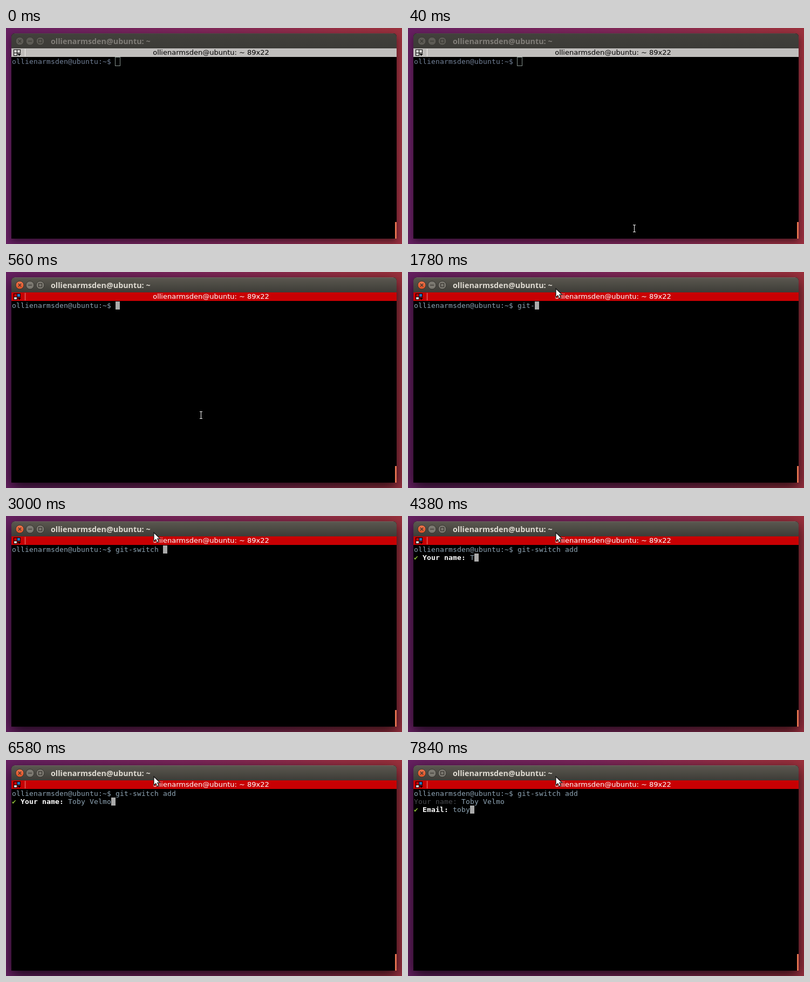
An HTML page with a canvas that plays this animation: 734x403 px, repeating every 8000 ms.

```html
<!DOCTYPE html>
<html lang="en">
<head>
<meta charset="utf-8">
<title>Terminal session</title>
<style>
  html, body { margin: 0; height: 100%; overflow: hidden; background: #5e1c5a; }
  canvas { display: block; }
</style>
</head>
<body>
<canvas id="stage" width="734" height="403"></canvas>
<script>
const ctx = document.getElementById('stage').getContext('2d');
const LOOP = 8000, FOCUS = 560;
const CELL = 8, LINE = 15, LEFT = 11, TOP = 55;
const HOST = 'ollienarmsden@ubuntu';

const COMMAND = { text: 'git-switch add', times: [1460, 1540, 1620, 1780, 2000, 2140, 2240, 2380, 2600, 2700, 3000, 3120, 3220, 3340] };
const NAME = { text: 'Toby Velmo', times: [4380, 4500, 4620, 4740, 5640, 5920, 6120, 6240, 6460, 6580] };
const EMAIL = { text: 'toby', times: [7500, 7620, 7740, 7840] };
const ENTER = 3680, ASK_NAME = 3760, ASK_EMAIL = 6900;

const typed = ({ text, times }, t) => text.slice(0, times.filter(at => at <= t).length);

function rect(color, x, y, w, h) {
  ctx.fillStyle = color;
  ctx.fillRect(x, y, w, h);
}

function label(text, x, y, font, color, align = 'left') {
  ctx.font = font;
  ctx.fillStyle = color;
  ctx.textAlign = align;
  ctx.fillText(text, x, y);
}

function vertical(y0, y1, ...colors) {
  const g = ctx.createLinearGradient(0, y0, 0, y1);
  colors.forEach((c, i) => g.addColorStop(i / (colors.length - 1), c));
  return g;
}

function line(color, width, ...points) {
  ctx.strokeStyle = color;
  ctx.lineWidth = width;
  ctx.beginPath();
  points.forEach(([x, y]) => ctx.lineTo(x, y));
  ctx.stroke();
}

function wallpaper() {
  const g = ctx.createLinearGradient(0, 100, 734, 0);
  g.addColorStop(0, '#651f61');
  g.addColorStop(0.5, '#7d2659');
  g.addColorStop(0.85, '#962e42');
  g.addColorStop(1, '#9a303c');
  rect(g, 0, 0, 734, 403);
}

function windowFrame(active) {
  ctx.save();
  ctx.shadowColor = active ? 'rgba(0,0,0,.75)' : 'rgba(0,0,0,.5)';
  ctx.shadowBlur = active ? 24 : 14;
  ctx.shadowOffsetY = active ? 8 : 5;
  ctx.fillStyle = '#000';
  ctx.beginPath();
  ctx.roundRect(10, 10, 714, 383, [6, 6, 0, 0]);
  ctx.fill();
  ctx.restore();

  ctx.fillStyle = active ? vertical(10, 38, '#5b5850', '#3d3c37') : vertical(10, 38, '#42413c', '#3c3b37');
  ctx.beginPath();
  ctx.roundRect(10, 10, 714, 28, [6, 6, 0, 0]);
  ctx.fill();
  rect(active ? '#6a675f' : '#4b4944', 16, 10, 702, 1);

  label(HOST + ': ~', 83, 30, 'bold 14.3px "Open Sans", sans-serif', active ? '#dfdbd2' : '#807d78');
  titleButtons(active);
}

function titleButtons(active) {
  const glyph = active ? '#3a3733' : '#393833';
  [25.5, 44.5, 63.5].forEach((x, i) => {
    ctx.beginPath();
    ctx.arc(x, 24.5, 7.5, 0, 7);
    ctx.fillStyle = !active ? '#5d5b55' : i ? '#7b7870' : vertical(17, 32, '#f0764e', '#dd4f22');
    ctx.fill();
    ctx.strokeStyle = active ? '#33312d' : '#383732';
    ctx.lineWidth = 1;
    ctx.stroke();
  });
  line(glyph, 1.3, [22.8, 21.8], [28.2, 27.2]);
  line(glyph, 1.3, [28.2, 21.8], [22.8, 27.2]);
  line(glyph, 1.3, [41, 24.5], [48, 24.5]);
  ctx.strokeRect(60.5, 21.5, 6, 6);
}

function paneBar(active) {
  rect(active ? '#c80003' : '#c0bebc', 10, 38, 714, 16);
  rect('#000', 14, 40, 13, 12);
  const face = active ? '#c80003' : '#d4d2d0';
  rect(face, 15, 41, 5, 5);
  rect(active ? '#2477bd' : face, 21, 41, 5, 5);
  rect(active ? '#d8d6d4' : face, 15, 47, 5, 4);
  rect(active ? '#c80003' : '#c0bebc', 21, 47, 7, 6);
  ctx.fillStyle = '#000';
  ctx.beginPath();
  ctx.moveTo(21, 48);
  ctx.lineTo(28, 48);
  ctx.lineTo(24.5, 52);
  ctx.fill();
  rect(active ? '#ee8a84' : '#f0eeec', 35, 39, 1, 14);
  label(HOST + ': ~ 89x22', 380, 50, '13px "DejaVu Sans", sans-serif', active ? '#fff' : '#000', 'center');
}

// Writes on the character grid and returns the next free column.
function write(text, col, row, color, bold) {
  [...text].forEach((c, i) =>
    label(c, LEFT + (col + i) * CELL, TOP + 12 + row * LINE, (bold ? 'bold ' : '') + '13px "DejaVu Sans Mono", monospace', color));
  return col + [...text].length;
}

function prompt(question, row) {
  write('✔', 0, row, '#8cb83a');
  return write(question + ' ', 2, row, '#fff', true);
}

function shell(t, active) {
  const ink = active ? '#8fa5b5' : '#74839a';
  let row = 0;
  let col = write(HOST + ':~$ ' + typed(COMMAND, t), 0, 0, ink);
  if (t >= ENTER) {
    row = 1;
    col = 0;
  }
  if (t >= ASK_NAME) {
    col = t < ASK_EMAIL ? prompt('Your name:', 1) : write('Your name: ', 0, 1, '#484a4f');
    col = write(typed(NAME, t), col, 1, ink);
  }
  if (t >= ASK_EMAIL) {
    row = 2;
    col = write(typed(EMAIL, t), prompt('Email:', 2), 2, ink);
  }

  const x = LEFT + col * CELL, y = TOP + row * LINE;
  const blinkedOff = t >= 1280 && t < COMMAND.times[0];
  if (!active) {
    ctx.strokeStyle = '#87948f';
    ctx.lineWidth = 1;
    ctx.strokeRect(x - 0.5, y - 0.5, 9, 16);
  } else if (!blinkedOff) {
    rect('#aaa', x, y, CELL, LINE);
  }
  rect('#e2714f', 721, 362, 3, 31);
}

function glide(t, start, end, from, to) {
  const p = Math.min(1, Math.max(0, (t - start) / (end - start)));
  const eased = p * (2 - p);
  return from.map((v, i) => Math.round(v + (to[i] - v) * eased));
}

function pointerAt(t) {
  if (t < 660) return glide(t, 0, 280, [440, 412], [361, 267]);
  if (t < 1060) return glide(t, 660, 920, [361, 267], [277, 34]);
  return t < 1080 ? [275, 32] : [274, 31];
}

function pointer(t) {
  if (t < 20) return;
  const [x, y] = pointerAt(Math.floor(t / 20) * 20);
  const inText = x >= 10 && x < 724 && y >= 54 && y < 393;
  if (inText) {
    rect('#fff', x, y - 7, 1, 14);
    rect('#fff', x - 2, y - 7, 5, 1);
    rect('#fff', x - 2, y + 6, 5, 1);
    return;
  }
  ctx.beginPath();
  [[0, 0], [0, 16], [3.8, 12.6], [6.6, 18.3], [9.4, 17], [6.7, 11.4], [11.6, 11.2]]
    .forEach(([dx, dy]) => ctx.lineTo(x + dx, y + dy));
  ctx.closePath();
  ctx.fillStyle = '#fff';
  ctx.fill();
  ctx.strokeStyle = '#111';
  ctx.lineWidth = 1.2;
  ctx.stroke();
}

function draw() {
  const t = performance.now() % LOOP;
  const active = t >= FOCUS;
  wallpaper();
  windowFrame(active);
  paneBar(active);
  shell(t, active);
  pointer(t);
  requestAnimationFrame(draw);
}
draw();
</script>
</body>
</html>
```
